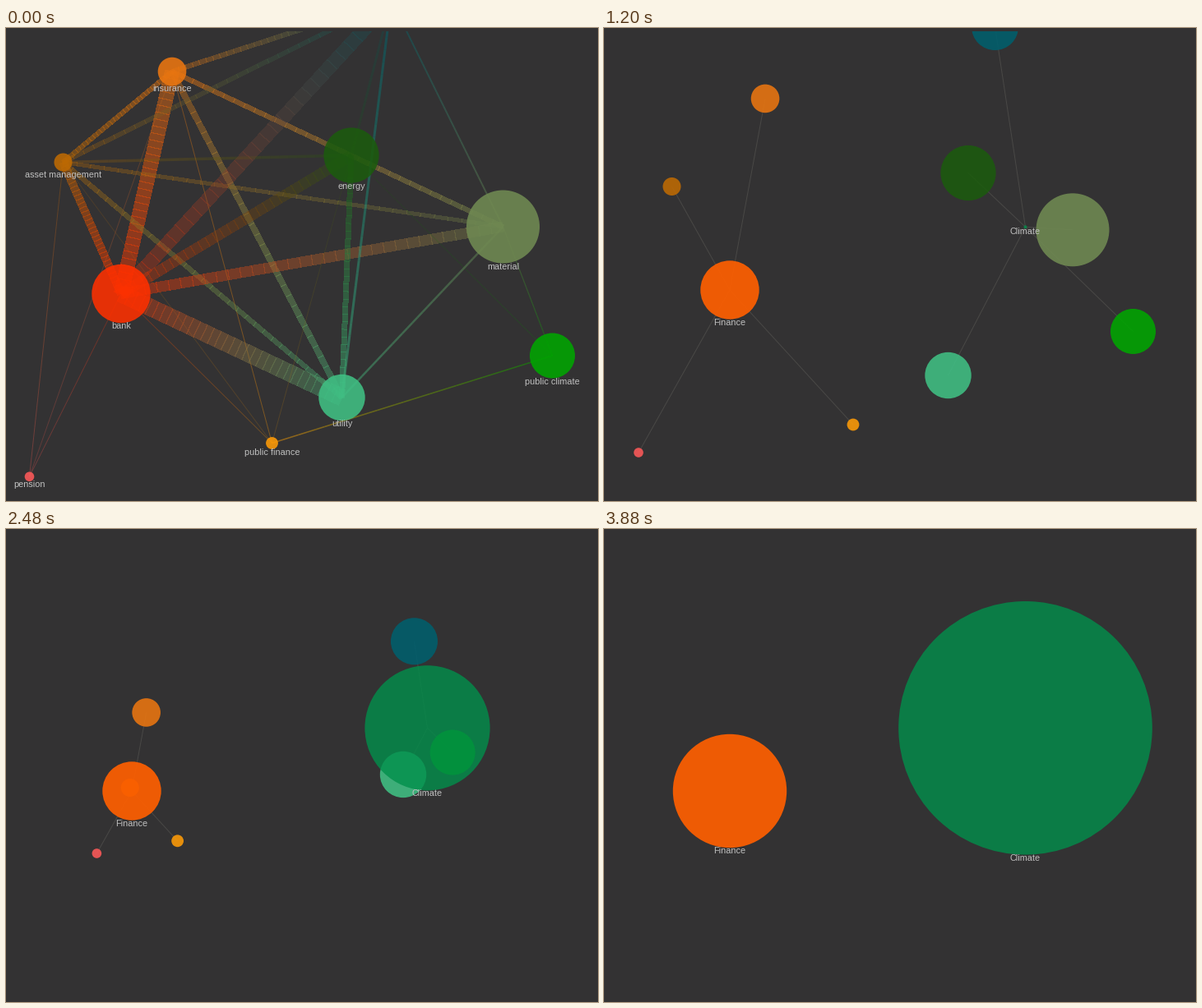
A matplotlib script that plays this animation: 720 px wide and 576 px high, repeating every 4 s.

```python
import numpy as np
import matplotlib.pyplot as plt
from matplotlib.animation import FuncAnimation
from matplotlib.collections import LineCollection
from matplotlib.patches import Circle, Rectangle

W, H, DPI = 720, 576, 100
PT = 72 / DPI                # points per pixel
FRAMES, INTERVAL = 100, 40
START = 22.5                 # frame at which nodes begin to fall into their hub
SPEED = 4.37                 # pixels per frame
HUB_R = 2
STEPS = 32                   # pieces per gradient link
BG = np.array([51, 50, 51]) / 255


def rgb(*c):
    return np.array(c) / 255


def glaze(color, alpha):
    """RGBA that shows as `color` when laid over the background."""
    c = np.clip((color - (1 - alpha) * BG) / alpha, 0, 1)
    return (*c, alpha)


# hub: centre, shown colour, opacity
HUBS = {
    "Finance": ((153, 319), rgb(240, 91, 0), 0.92),
    "Climate": ((512.5, 242.3), rgb(11, 124, 70), 0.8),
}

# node: label, hub, radius, colour, first place, place when the fall begins
NODES = {
    "ins": ("insurance", "Finance", 17.3, rgb(213, 110, 20), (202, 53), (202, 53.7)),
    "asset": ("asset management", "Finance", 11, rgb(174, 99, 8), (69.5, 163.5), (66.5, 164.4)),
    "bank": ("bank", "Finance", 35.7, rgb(240, 48, 4), (140, 323.5), (144.8, 322.7)),
    "pension": ("pension", "Finance", 5.8, rgb(230, 84, 84), (28.5, 546.3), (26, 545.6)),
    "fin": ("public finance", "Finance", 7.4, rgb(232, 143, 12), (323.5, 505.5), (325.1, 507.2)),
    "sky": ("", "Climate", 28.5, rgb(0, 90, 102), (468.5, -34), (470.6, -33.9)),
    "energy": ("energy", "Climate", 33.6, rgb(31, 86, 18), (420, 155), (419.2, 154)),
    "mat": ("material", "Climate", 44.5, rgb(105, 127, 78), (604.5, 242), (602.7, 247.8)),
    "util": ("utility", "Climate", 28.2, rgb(62, 175, 122), (408.5, 450), (403.4, 452.1)),
    "clim": ("public climate", "Climate", 27.5, rgb(0, 152, 0), (664.5, 399), (667, 392.3)),
}

# link: ends, width in pixels, opacity
LINKS = [
    ("ins", "bank", 17, 0.5), ("ins", "asset", 5, 0.5), ("ins", "sky", 5, 0.42),
    ("ins", "mat", 5, 0.52), ("ins", "util", 6.5, 0.42), ("ins", "fin", 1, 0.4),
    ("ins", "pension", 1, 0.25), ("asset", "bank", 9, 0.5), ("asset", "sky", 4.5, 0.32),
    ("asset", "energy", 3.5, 0.3), ("asset", "mat", 4, 0.36), ("asset", "util", 5, 0.4),
    ("asset", "pension", 1, 0.35), ("asset", "fin", 1, 0.18), ("bank", "sky", 16, 0.32),
    ("bank", "energy", 12, 0.36), ("bank", "mat", 12, 0.45), ("bank", "util", 20, 0.4),
    ("bank", "pension", 1, 0.3), ("bank", "fin", 1, 0.3), ("sky", "energy", 3, 0.25),
    ("sky", "mat", 2, 0.5), ("sky", "util", 3, 0.55), ("energy", "util", 6, 0.5),
    ("energy", "fin", 1, 0.2), ("energy", "clim", 1, 0.2), ("mat", "util", 2.5, 0.5),
    ("mat", "clim", 1.3, 0.4), ("fin", "clim", 1.6, 0.55),
]


def place(key, i):
    """Position of a node and whether its hub has swallowed it."""
    _, hub, _, _, first, seat = NODES[key]
    first, seat = np.array(first), np.array(seat)
    if i < START:
        return first + (seat - first) * i / START, False
    centre = np.array(HUBS[hub][0])
    left = 1 - SPEED * (i - START) / np.hypot(*(seat - centre))
    return centre + (seat - centre) * max(left, 0), left <= 0


def pieces(a, b):
    pts = a + (b - a) * np.linspace(0, 1, STEPS + 1)[:, None]
    return np.stack([pts[:-1], pts[1:]], axis=1)


fig = plt.figure(figsize=(W / DPI, H / DPI), dpi=DPI, facecolor=BG)
ax = fig.add_axes([0, 0, 1, 1])
ax.set_xlim(0, W)
ax.set_ylim(H, 0)
ax.axis("off")


def label(text):
    return ax.text(0, 0, text, family="Liberation Sans", size=10.9 * PT,
                   color=rgb(192, 192, 192), ha="center", va="baseline", zorder=5)


def disc(r, color, z):
    return ax.add_patch(Circle((0, 0), r, fc=color, ec="none", zorder=z))


colors, widths, smooth = [], [], []
for a, b, width, alpha in LINKS:
    ca, cb = NODES[a][3], NODES[b][3]
    for t in (np.arange(STEPS) + 0.5) / STEPS:
        colors.append((*(ca + (cb - ca) * t), alpha))
    widths += [width * PT] * STEPS
    smooth += [width < 4] * STEPS      # wide bands would show seams

web = LineCollection([], colors=colors, linewidths=widths, antialiaseds=smooth,
                     capstyle="butt", zorder=1)
spokes = LineCollection([], colors=[rgb(73, 72, 70)], linewidths=PT, zorder=2)
ax.add_collection(web, autolim=False)
ax.add_collection(spokes, autolim=False)

discs = {k: disc(n[2], glaze(n[3], 0.88), 3) for k, n in NODES.items()}
names = {k: label(n[0]) for k, n in NODES.items()}
hub_discs = {k: disc(HUB_R, glaze(c, a), 4) for k, (_, c, a) in HUBS.items()}
hub_names = {k: label(k) for k in HUBS}

# the picture leaves a thin empty strip along the top
ax.add_patch(Rectangle((0, 0), W, 3.5, fc=BG, ec="none", zorder=6))


def draw(i):
    falling = i >= START
    spots = {k: place(k, i) for k in NODES}
    radii = dict.fromkeys(HUBS, HUB_R)
    lines = []

    for key, (pos, joined) in spots.items():
        hub, r = NODES[key][1:3]
        discs[key].center = pos
        discs[key].set_visible(not joined)
        names[key].set_position((pos[0], pos[1] + r + 7))
        names[key].set_visible(not falling)
        if joined:
            radii[hub] += r - HUB_R
        elif falling:
            lines.append([HUBS[hub][0], pos])

    web.set_visible(not falling)
    if not falling:
        web.set_segments(np.concatenate(
            [pieces(spots[a][0], spots[b][0]) for a, b, *_ in LINKS]))
    spokes.set_segments(lines)

    for hub, (centre, _, _) in HUBS.items():
        hub_discs[hub].center = centre
        hub_discs[hub].set_radius(radii[hub])
        hub_discs[hub].set_visible(falling)
        hub_names[hub].set_position((centre[0], centre[1] + radii[hub] + 7))
        hub_names[hub].set_visible(falling)
    return []


anim = FuncAnimation(fig, draw, frames=FRAMES, init_func=lambda: draw(0),
                     interval=INTERVAL, repeat=True, repeat_delay=0)
plt.show()
```
